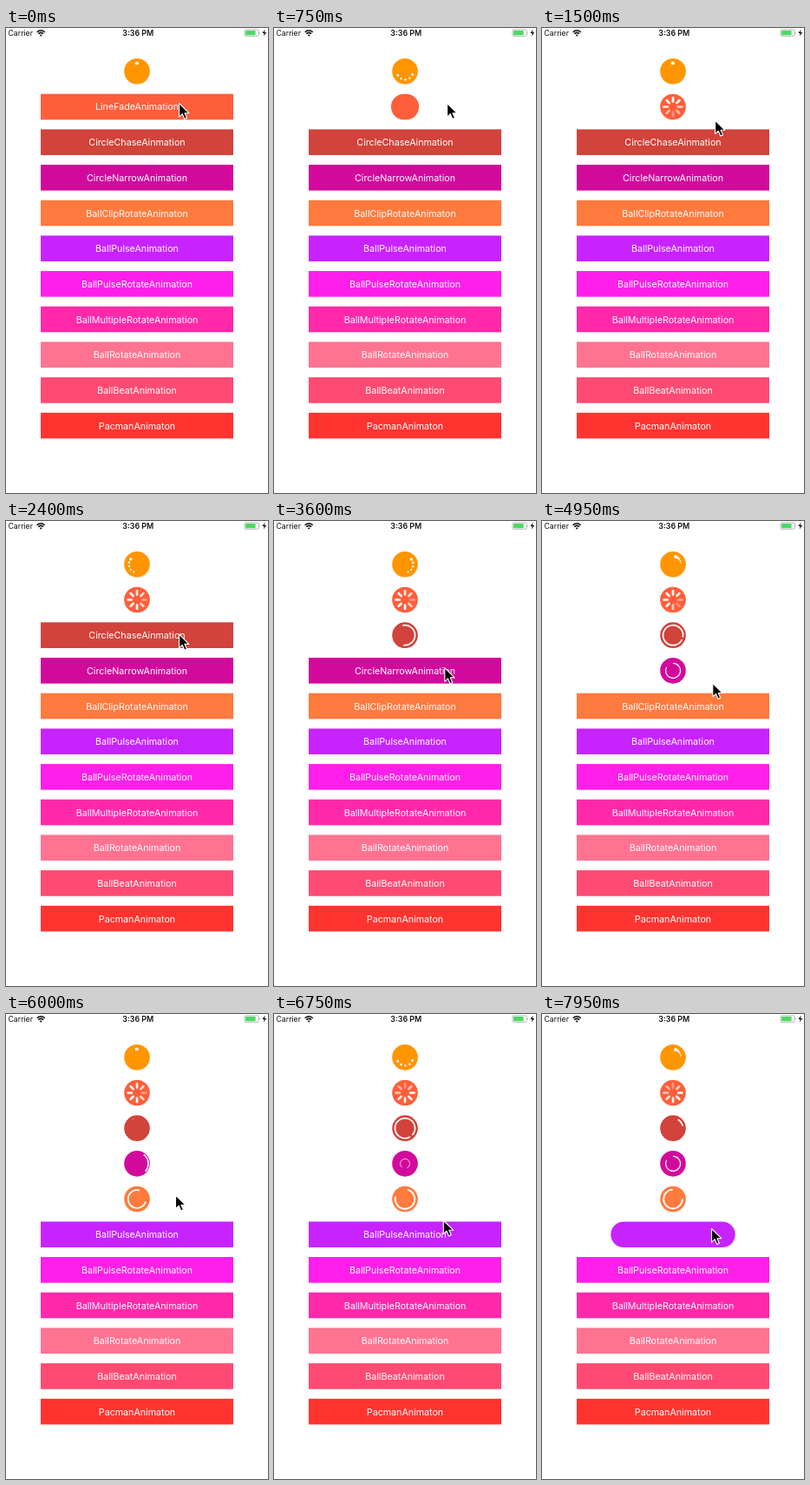
An HTML page that plays this animation: 302x534 px, repeating every 8 s.

```html
<!DOCTYPE html>
<html lang="en">
<head>
<meta charset="utf-8">
<title>Button loading animations</title>
<style>
html, body { margin: 0; width: 100%; height: 100%; overflow: hidden; background: #fff; }
svg { display: block; width: 302px; height: 534px; font-family: Inter, Roboto, sans-serif; }
.label { font-size: 10.7px; fill: #fff; text-anchor: middle; }
.ring { fill: none; stroke: #fff; stroke-linecap: butt; }
</style>
</head>
<body>
<svg id="stage" viewBox="0 0 302 534">
  <rect width="302" height="534" fill="#fff"/>
  <g id="status" fill="#111">
    <text x="2.5" y="8.9" font-size="8.7">Carrier</text>
    <g fill="none" stroke="#111" stroke-width="1.5">
      <path d="M35.6 4.7Q40.2 .8 44.8 4.7M37.3 6.6Q40.2 4.2 43.1 6.6"/>
    </g>
    <path d="M38.6 8Q40.2 6.8 41.8 8L40.2 9.7Z"/>
    <text x="152.3" y="8.9" font-size="8.9" font-weight="600" text-anchor="middle">3:36 PM</text>
    <rect x="274.9" y="1.9" width="16.4" height="7.4" rx="1.6" fill="#fff" stroke="#999" stroke-width=".7"/>
    <rect x="276" y="3" width="11.6" height="5.2" rx=".7" fill="#4cd964"/>
    <path d="M292.2 4.2Q293.5 5.6 292.2 7Z" fill="#999"/>
    <path d="M298.6 1.8L295.4 6H297.6L296.8 9.6L300.2 5H298Z"/>
  </g>
  <g id="rows"></g>
  <path id="cursor" d="M0 0V15.6L3.7 12.2L6.2 18L8.9 16.8L6.4 11.2H11.3Z"
    fill="#000" stroke="#fff" stroke-width="1.1" stroke-linejoin="round"/>
</svg>
<script>
const LOOP = 8000, STEP = 150, CX = 151, FULL = 222, SIZE = 29.6;
const ROUND_MS = 100, SHRINK_MS = 200;
const TAU = Math.PI * 2;
const NS = "http://www.w3.org/2000/svg";

// label, colour, press time
const ROWS = [
  ["", "#ff9500", -5000],
  ["LineFadeAnimation", "#ff5e3a", 480],
  ["CircleChaseAinmation", "#d1433b", 2410],
  ["CircleNarrowAnimation", "#d20a9c", 4000],
  ["BallClipRotateAnimaton", "#ff7a3d", 5530],
  ["BallPulseAnimation", "#c723ff", 7800],
  ["BallPulseRotateAnimation", "#ff1eea", Infinity],
  ["BallMultipleRotateAnimation", "#ff29a9", Infinity],
  ["BallRotateAnimation", "#ff7391", Infinity],
  ["BallBeatAnimation", "#ff4b73", Infinity],
  ["PacmanAnimaton", "#ff3430", Infinity]
];

// time, x, y of the pointer tip
const POINTER = [
  [0, 199.6, 86.5], [1050, 199.6, 86.5], [2050, 199.6, 130], [2900, 199.6, 130.5],
  [3150, 199, 152], [3500, 196.8, 168.7], [4500, 196.8, 168.7], [4950, 196.8, 186.3],
  [5250, 196, 205], [5400, 195.5, 208], [6300, 195.5, 208], [6750, 195.3, 237],
  [7050, 195.5, 246.5], [8000, 195.5, 246.5]
];

const clamp = v => Math.min(1, Math.max(0, v));
const mix = (a, b, p) => a + (b - a) * p;
const mod = (a, b) => ((a % b) + b) % b;

function bezier(x1, y1, x2, y2) {
  const at = (a, b, s) => 3 * (1 - s) ** 2 * s * a + 3 * (1 - s) * s * s * b + s ** 3;
  return x => {
    if (x <= 0) return 0;
    if (x >= 1) return 1;
    let lo = 0, hi = 1;
    for (let i = 0; i < 24; i++) {
      const mid = (lo + hi) / 2;
      if (at(x1, x2, mid) < x) lo = mid; else hi = mid;
    }
    return at(y1, y2, lo);
  };
}
const ease = bezier(.25, .1, .25, 1);
const strokeEase = bezier(.4, 0, .2, 1);
const ballEases = [0, 1, 2, 3, 4].map(i => bezier(.5, .15 + i / 5, .25, 1));

function add(parent, tag, attrs) {
  const el = document.createElementNS(NS, tag);
  set(el, attrs);
  parent.appendChild(el);
  return el;
}
function set(el, attrs) {
  for (const k in attrs) el.setAttribute(k, attrs[k]);
}

// turns run clockwise from the top
function point(r, turn) {
  return [r * Math.sin(turn * TAU), -r * Math.cos(turn * TAU)];
}
function arc(r, from, to) {
  const span = Math.min(to - from, .9999);
  if (span <= 0 || r <= 0) return "";
  const f = p => p.map(v => v.toFixed(3)).join(" ");
  return `M${f(point(r, from))}A${r} ${r} 0 ${span > .5 ? 1 : 0} 1 ${f(point(r, from + span))}`;
}

const rows = ROWS.map(([label, color, press], i) => {
  const y = 49.8 + 40.68 * i;
  const group = add(document.getElementById("rows"), "g", { transform: `translate(${CX} ${y})` });
  const box = add(group, "rect", { y: -SIZE / 2, height: SIZE, fill: color });
  const text = add(group, "text", { class: "label", y: 4 });
  text.textContent = label;
  return { group, box, text, press, start: press + ROUND_MS + SHRINK_MS };
});

const balls = ballEases.map(() => add(rows[0].group, "circle", { fill: "#fff" }));
const spokes = Array.from({ length: 8 }, (_, i) => add(rows[1].group, "rect", {
  x: 4.8, y: -1.35, width: 7, height: 2.7, rx: 1.3, fill: "#fff", transform: `rotate(${i * 45})`
}));
const [chase, narrow, clip] = [2, 3, 4].map(i => add(rows[i].group, "path", { class: "ring" }));

function drawBalls(t) {
  const p = mod(t / 1500 - .19, 1);
  balls.forEach((ball, i) => {
    const q = ballEases[i](p);
    const [cx, cy] = point(9.4, q);
    set(ball, { cx, cy, r: 1.95 * mix(1 - i / 5, .2 + i / 5, q) });
  });
}

function drawSpokes(t) {
  spokes.forEach((spoke, i) => {
    const local = t - 120 * (i + 1);
    const p = local < 0 ? 0 : ease(mod(local, 1200) / 1200);
    set(spoke, { opacity: t < 0 ? 0 : .3 + .7 * Math.abs(1 - 2 * p) });
  });
}

function drawChase(t) {
  const ms = mod(t, 1700), turn = ms / 1700;
  const head = strokeEase(ms / 700), tail = strokeEase((ms - 500) / 1200);
  set(chase, { d: t < 0 ? "" : arc(11.5, turn + tail, turn + head), "stroke-width": 1.7 });
}

function drawNarrow(t) {
  const p = mod(t, 1500) / 1500;
  const from = 3 * (p - .433);
  const d = t < 0 ? "" : arc(15 * (1 - p), from, from + Math.min(.83, 2 * p));
  set(narrow, { d, "stroke-width": 2 * (1 - p) });
}

function drawClip(t) {
  const p = mod(t, 1000) / 1000;
  const scale = .6 + .4 * Math.abs(1 - 2 * p);
  set(clip, { d: t < 0 ? "" : arc(12 * scale, p + .125, p + .875), "stroke-width": 2 * scale });
}

function drawPointer(t) {
  const i = POINTER.findIndex(k => k[0] > t);
  const a = POINTER[i - 1], b = POINTER[i];
  const p = (t - a[0]) / (b[0] - a[0]);
  set(document.getElementById("cursor"), {
    transform: `translate(${mix(a[1], b[1], p)} ${mix(a[2], b[2], p)})`
  });
}

function render(t) {
  for (const { box, text, press } of rows) {
    const age = t - press;
    const width = mix(FULL, SIZE, ease((age - ROUND_MS) / SHRINK_MS));
    set(box, { x: -width / 2, width, rx: clamp(age / ROUND_MS) * SIZE / 2 });
    set(text, { visibility: age < 0 ? "visible" : "hidden" });
  }
  drawBalls(t);
  drawSpokes(t - rows[1].start);
  drawChase(t - rows[2].start);
  drawNarrow(t - rows[3].start);
  drawClip(t - rows[4].start);
  drawPointer(t);
}

// the picture steps at a fixed rate
const origin = performance.now();
function tick() {
  const t = mod(performance.now() - origin, LOOP);
  render(Math.floor(t / STEP) * STEP);
  requestAnimationFrame(tick);
}
tick();
</script>
</body>
</html>
```
